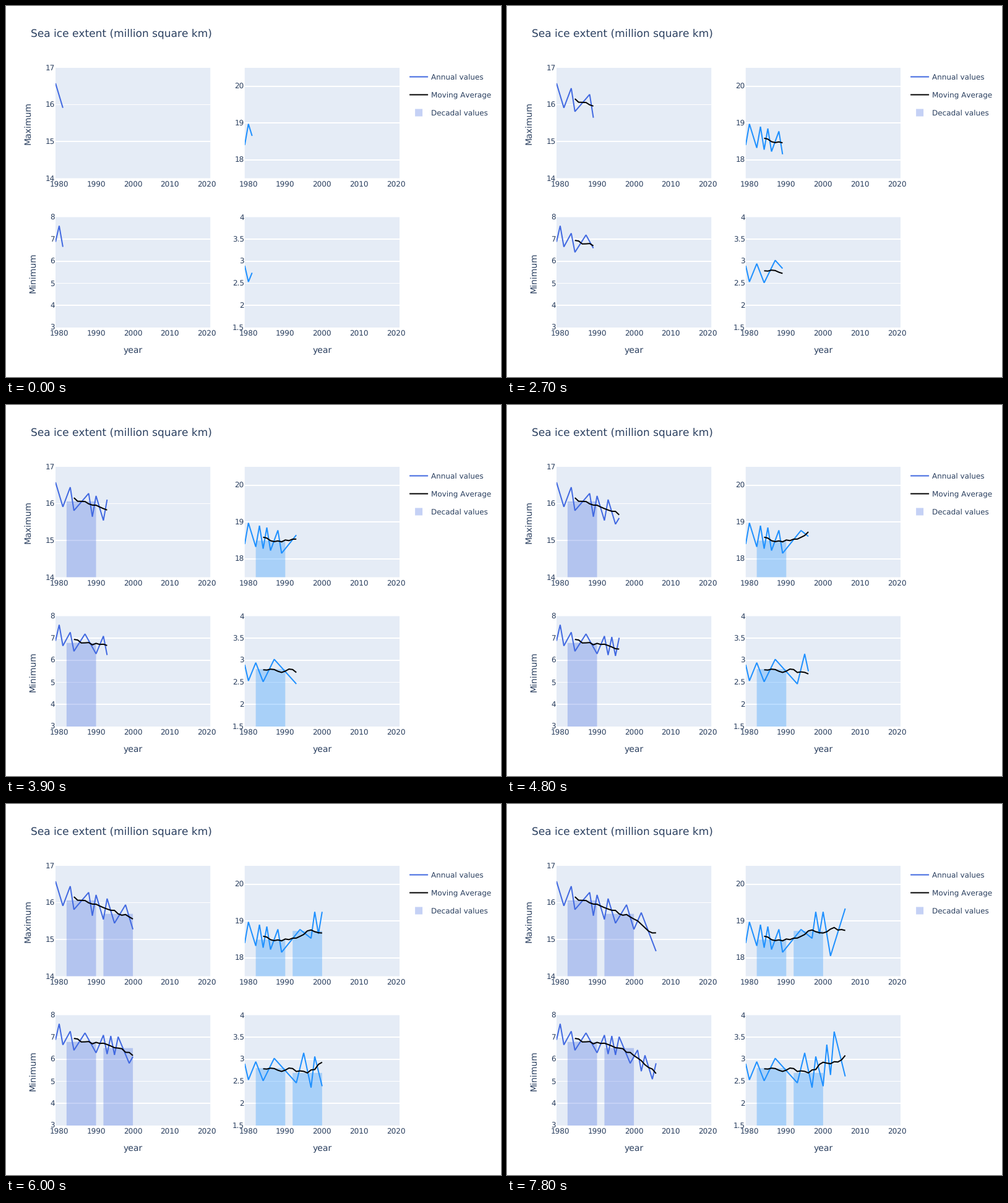
A matplotlib script for the animation above (8 s loop, 800x600 px).

```python
import math

import numpy as np
import matplotlib.pyplot as plt
from matplotlib.animation import FuncAnimation
from matplotlib.patches import Rectangle

WIDTH, HEIGHT, DPI = 800, 600, 100
PT = 72 / DPI  # points per pixel
INTERVAL, LOOP, STEP = 100, 8000, 300
FIRST_YEAR, X_END = 1979, 2021
PANEL_W, PANEL_H = 250.2, 178.5
LEFT, RIGHT, UPPER, LOWER = 80, 385.8, 100, 341.5
INK, PANEL_BG = "#2a3f5f", "#e5ecf6"
ROYAL, DODGER = "#4169e1", "#1e90ff"

plt.rcParams.update({
    "font.family": "DejaVu Sans",
    "text.hinting": "none",
    "text.hinting_factor": 1,
})

fig = plt.figure(figsize=(WIDTH / DPI, HEIGHT / DPI), dpi=DPI, facecolor="white")
ax = fig.add_axes([0, 0, 1, 1])
ax.set(xlim=(0, WIDTH), ylim=(HEIGHT, 0))
ax.axis("off")


def label(x, y, text, size=12, **style):
    ax.text(x, y, text, fontsize=size * PT, color=INK, zorder=6,
            va="baseline", **style)


def stroke(x, y, color, zorder=4, join="bevel"):
    line, = ax.plot(x, y, color=color, lw=2 * PT, zorder=zorder, snap=False,
                    solid_capstyle="butt", solid_joinstyle=join)
    return line


def box(x, y, w, h, color, zorder, alpha=1):
    return ax.add_patch(Rectangle((x, y), w, h, fc=color, ec="none", alpha=alpha,
                                  zorder=zorder, snap=False))


def zigzag(trend, swing, first_side, turns):
    """Yearly values swinging between peaks and troughs around a trend.

    trend holds (years since start, value) knots; swing is the size of the
    deviation at the start and at the end; turns are the turning years.
    """
    turns = np.array(turns)
    sides = first_side * (-1) ** np.arange(len(turns))
    sizes = np.interp(turns, [0, turns[-1]], swing)
    turning_values = np.interp(turns, *zip(*trend)) + sides * sizes
    return np.interp(np.arange(turns[-1] + 1), turns, turning_values)


class Panel:
    def __init__(self, left, top, low, high, ticks, color, values):
        self.left, self.top, self.low, self.high = left, top, low, high
        bottom = top + PANEL_H
        frame = box(left, top, PANEL_W, PANEL_H, PANEL_BG, 1)
        for tick in ticks:
            y = self.y(tick)
            if low < tick < high:
                # Unsmoothed hairline: fills every pixel row it clearly touches.
                start, end = math.floor(y - 0.35), math.ceil(y + 0.35)
                box(left, start, PANEL_W, end - start, "white", 2)
            label(left - 1, y + 4.2, f"{tick:g}", ha="right")
        for year in range(1980, 2021, 10):
            label(self.x(year), bottom + 14.2, str(year), ha="center")

        self.years = FIRST_YEAR + np.arange(len(values))
        self.values = values
        self.mean_years = self.years[5:-4]
        self.means = np.convolve(values, np.ones(10) / 10, "valid")
        self.annual = stroke([], [], color)
        self.average = stroke([], [], "black", zorder=5, join="miter")
        for line in (self.annual, self.average):
            line.set_clip_path(frame)

        # Each bar appears once its decade is complete.
        self.bars = []
        for end in (1990, 2000):
            y = self.y(self.means[self.mean_years == end - 4][0])
            x = self.x(end - 8)
            bar = box(x, y, self.x(end) - x, bottom - y, color, 3, 0.3)
            self.bars.append((end, bar))

    def x(self, year):
        return self.left + (year - FIRST_YEAR) * PANEL_W / (X_END - FIRST_YEAR)

    def y(self, value):
        return self.top + (self.high - value) * PANEL_H / (self.high - self.low)

    def show(self, year):
        for line, years, values in ((self.annual, self.years, self.values),
                                    (self.average, self.mean_years, self.means)):
            seen = years <= year
            line.set_data(self.x(years[seen]), self.y(values[seen]))
        for end, bar in self.bars:
            bar.set_visible(year >= end)


north_max = zigzag(
    trend=[(0, 16.28), (22, 15.54), (27, 14.98), (31, 15)],
    swing=(0.3, 0.3), first_side=1,
    turns=[0, 2, 4, 5, 9, 10, 11, 13, 14, 16, 19, 21, 23, 27, 31])
south_max = zigzag(
    trend=[(0, 18.7), (14, 18.35), (19, 18.95), (21, 18.95), (23, 18.35),
           (27, 19.04), (31, 18.7)],
    swing=(0.3, 0.3), first_side=-1,
    turns=[0, 1, 3, 4, 5, 6, 7, 9, 10, 15, 18, 19, 20, 21, 23, 27, 29, 31])
north_min = zigzag(
    trend=[(0, 7.3), (4, 6.85), (17, 6.6), (27, 5.4), (31, 4.5)],
    swing=(0.42, 0.42), first_side=-1,
    turns=[0, 1, 2, 4, 5, 8, 11, 13, 14, 15, 16, 17, 20, 22, 23, 24, 26, 27,
           28, 30, 31])
south_min = zigzag(
    trend=[(0, 2.72), (16, 2.8), (20, 2.65), (24, 3.2), (31, 2.9)],
    swing=(0.18, 0.5), first_side=1,
    turns=[0, 1, 3, 5, 8, 14, 16, 18, 19, 21, 22, 23, 24, 27, 31])

panels = [
    Panel(LEFT, UPPER, 14, 17, range(14, 18), ROYAL, north_max),
    Panel(RIGHT, UPPER, 17.5, 20.5, range(18, 21), DODGER, south_max),
    Panel(LEFT, LOWER, 3, 8, range(3, 9), ROYAL, north_min),
    Panel(RIGHT, LOWER, 1.5, 4, np.arange(1.5, 4.1, 0.5), DODGER, south_min),
]

label(40, 50, "Sea ice extent (million square km)", 17.3)
for left in (LEFT, RIGHT):
    label(left + PANEL_W / 2, 561, "year", 14, ha="center")
for x, top, text in ((39, UPPER, "Maximum"), (47, LOWER, "Minimum")):
    label(x, top + PANEL_H / 2 + 0.5, text, 14, rotation=90, ha="center",
          rotation_mode="anchor")

for y, text, color in ((114.5, "Annual values", ROYAL),
                       (143.5, "Moving Average", "black"),
                       (172.5, "Decadal values", None)):
    if color:
        stroke([652.1, 682.1], [y, y], color)
    else:
        box(661.1, y - 6, 12, 12, ROYAL, 4, 0.3)
    label(687, y + 4.5, text, 11.8)


def update(frame):
    year = 1980 + max(1, frame * INTERVAL // STEP)
    for panel in panels:
        panel.show(year)


anim = FuncAnimation(fig, update, frames=LOOP // INTERVAL, interval=INTERVAL,
                     repeat=True, repeat_delay=0)
plt.show()
```
